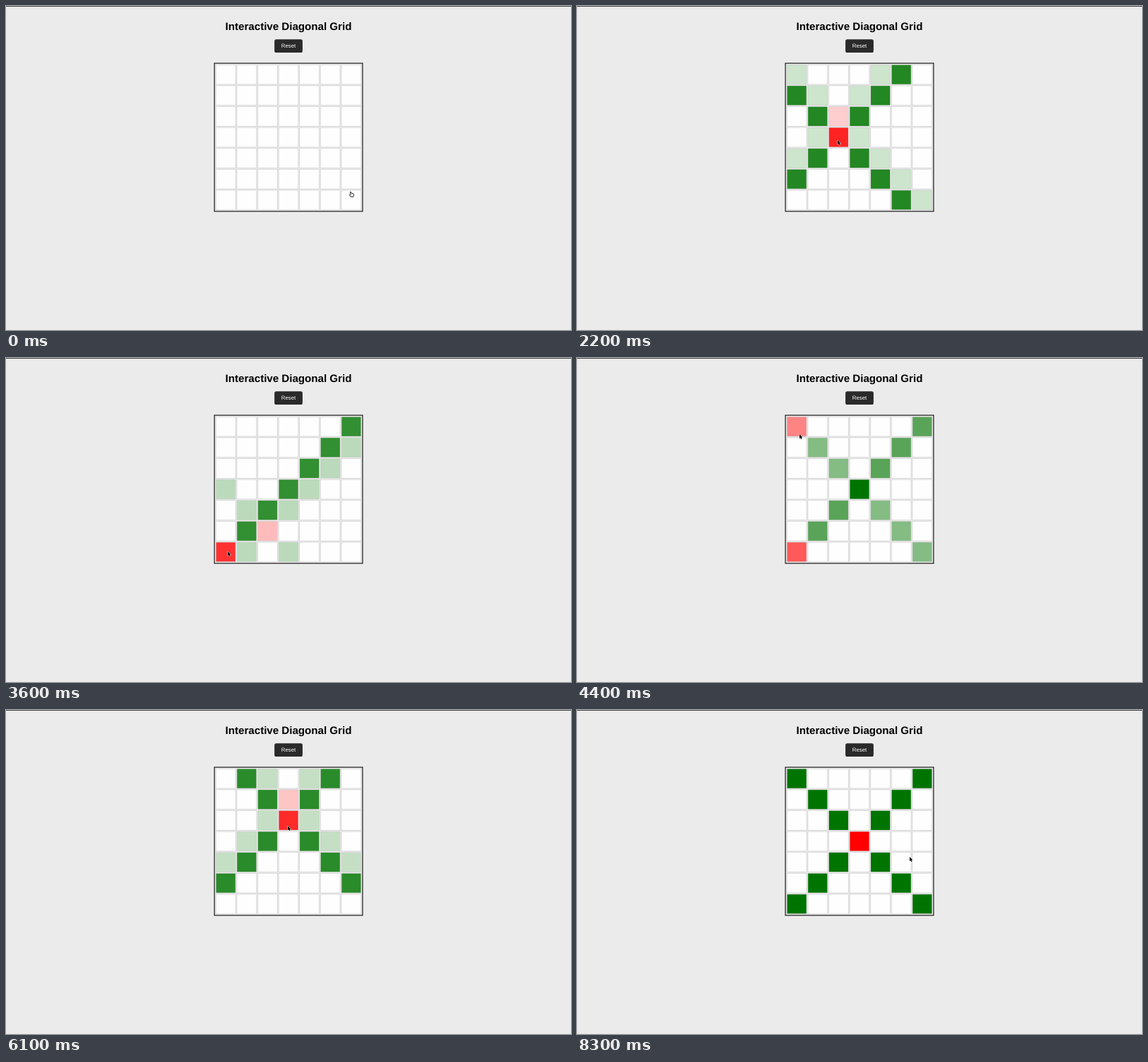
These frames come from a looping animation (800 by 459 pixels, 8800 ms). An HTML page with a canvas:

```html
<!DOCTYPE html>
<html lang="en">
<head>
<meta charset="utf-8">
<title>Interactive Diagonal Grid</title>
<style>
  html, body { margin: 0; height: 100%; overflow: hidden; background: #ebebeb; }
  canvas { display: block; }
</style>
</head>
<body>
<canvas width="800" height="459"></canvas>
<script>
const ctx = document.querySelector('canvas').getContext('2d');
const LOOP = 8800, STEP = 100, FADE = 300, OUT_DELAY = 18;
const ZOOM = .63, CELL = 45, PITCH = 47, SIZE = 7, GRID = 335;
const CENTER_X = 400, CENTER_Y = 186;
const PAGE = '#ebebeb', WHITE = [254, 254, 254], GREEN = [0, 116, 0], RED = [255, 0, 0];

const toCell = (v, center) => Math.round((v - center) / (PITCH * ZOOM)) + 3;

// Each click fixes where the pointer rests and which cell turns red.
const clicks = [
  [540, 437, 182], [1315, 372, 168], [2030, 369, 190],
  [2740, 364, 256.5], [3450, 314, 274], [4315, 315, 108],
  [5210, 392, 134], [5940, 398, 158], [6490, 402, 185]
].map(([time, x, y]) => ({ time, x, y, col: toCell(x, CENTER_X), row: toCell(y, CENTER_Y) }));
const stops = [{ time: 0, x: 488, y: 263 }, ...clicks, { time: 7600, x: 471, y: 208 }];

const clamp = v => Math.min(1, Math.max(0, v));
const mix = (a, b, p) => a + (b - a) * p;

// The CSS "ease" curve: cubic-bezier(.25, .1, .25, 1)
function ease(x) {
  const bezier = (a, b, s) => 3 * a * s * (1 - s) ** 2 + 3 * b * s * s * (1 - s) + s ** 3;
  let lo = 0, hi = 1;
  for (let i = 0; i < 20; i++) {
    const mid = (lo + hi) / 2;
    if (bezier(.25, .25, mid) < x) lo = mid; else hi = mid;
  }
  return x >= 1 ? 1 : bezier(.1, 1, lo);
}

function cellColor(click, row, col) {
  if (!click) return WHITE;
  const dy = Math.abs(row - click.row), dx = Math.abs(col - click.col);
  return dx !== dy ? WHITE : dx ? GREEN : RED;
}

function square(color, x, y, size) {
  ctx.fillStyle = color;
  ctx.fillRect(x, y, size, size);
}

function drawGrid(t) {
  const last = clicks.filter(c => c.time <= t).length - 1;
  ctx.save();
  ctx.translate(CENTER_X, CENTER_Y);
  ctx.scale(ZOOM, ZOOM);
  square('#222', -GRID / 2, -GRID / 2, GRID);
  square(PAGE, 2 - GRID / 2, 2 - GRID / 2, GRID - 4);
  for (let row = 0; row < SIZE; row++) {
    for (let col = 0; col < SIZE; col++) {
      const from = cellColor(clicks[last - 1], row, col);
      const to = cellColor(clicks[last], row, col);
      const delay = to === WHITE ? OUT_DELAY : 0;
      const p = last < 0 ? 1 : ease(clamp((t - clicks[last].time - delay) / FADE));
      const x = (col - 3) * PITCH - CELL / 2, y = (row - 3) * PITCH - CELL / 2;
      square('#ccc', x, y, CELL);
      square(`rgb(${from.map((v, i) => Math.round(mix(v, to[i], p)))})`, x + 1, y + 1, CELL - 2);
    }
  }
  ctx.restore();
}

// The pointer glides to each stop and settles shortly before its click.
function pointerAt(t) {
  let { x, y } = stops[0];
  for (const stop of stops.slice(1)) {
    const u = clamp((t - stop.time + 520) / 420), p = u * u * (3 - 2 * u);
    x = mix(x, stop.x, p);
    y = mix(y, stop.y, p);
  }
  return [x, y];
}

const arrow = new Path2D('M0 0V6.2L1.4 5L2.4 7.2L3.5 6.7L2.6 4.6H4.5Z');
const hand = new Path2D('M-.6 .4Q0 -.4 .6 .4L1.2 2.3L3.8 2.9Q4.7 3.3 4.5 4.6L3.8 7.4H.3L-1.8 4.6Q-1.6 3.6 -.3 4.2Z');

function drawPointer(t) {
  ctx.save();
  ctx.translate(...pointerAt(t));
  ctx.lineJoin = 'round';
  ctx.lineWidth = .9;
  if (t < clicks[0].time) {
    ctx.fillStyle = '#e4e4e4';
    ctx.fill(hand);
    ctx.strokeStyle = '#222';
    ctx.stroke(hand);
  } else {
    ctx.strokeStyle = '#fff';
    ctx.stroke(arrow);
    ctx.fillStyle = '#000';
    ctx.fill(arrow);
  }
  ctx.restore();
}

function label(text, weight, size, color, y) {
  ctx.font = `${weight} ${size * ZOOM}px "Liberation Sans", Arial, sans-serif`;
  ctx.textRendering = 'geometricPrecision';
  ctx.textAlign = 'center';
  ctx.fillStyle = color;
  ctx.fillText(text, CENTER_X, y);
}

function draw(t) {
  ctx.fillStyle = PAGE;
  ctx.fillRect(0, 0, 800, 459);
  ctx.fillStyle = '#444';
  ctx.fillRect(0, 0, 800, 1);
  label('Interactive Diagonal Grid', 'bold', 24, '#000', 33.7);

  ctx.fillStyle = '#2a2a2a';
  ctx.beginPath();
  ctx.roundRect(380.1, 47.2, 39.8, 18.8, 2.6);
  ctx.fill();
  label('Reset', 'normal', 12.4, '#fff', 59.3);

  drawGrid(t);
  drawPointer(t);
}

function tick() {
  const t = performance.now() % LOOP;
  draw(Math.floor(t / STEP) * STEP);
  requestAnimationFrame(tick);
}
tick();
</script>
</body>
</html>
```
